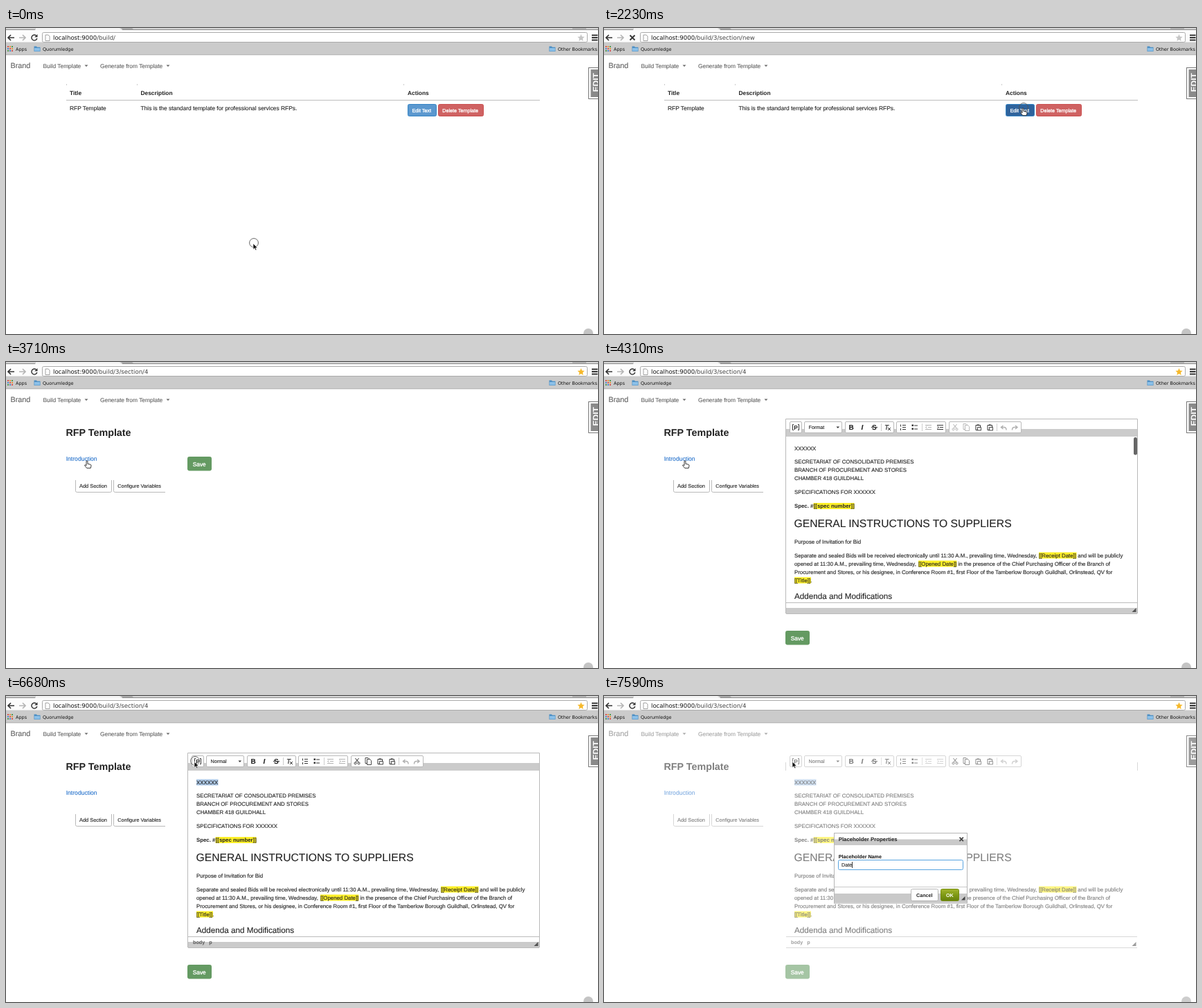
Write an HTML page that moves like this. It is 855x443 px and loops after 8 s.

```html
<!DOCTYPE html>
<html lang="en">
<head>
<meta charset="utf-8">
<title>Template builder</title>
<style>
html,body{margin:0;width:100%;height:100%;overflow:hidden;background:#fff}
svg{display:block;width:100vw;height:100vh}
text{font:8.4px "Liberation Sans",Arial,sans-serif;fill:#222;stroke:#222;stroke-width:.12px;text-rendering:geometricPrecision;white-space:pre}
.ui text{font:6.5px "DejaVu Sans",sans-serif;fill:#111;stroke:none}
.ui #url{font-size:8.57px}
.nav text{fill:#606060;stroke:#606060}
text.b{font-weight:700;stroke:none}
.btn text{font-size:7.2px}
.w text,text.w{fill:#fff;stroke:#fff;stroke-width:.32px}
.doc text,.tool text{font-size:7.83px}
.doc .h1{font-size:15.68px}
.doc .h2{font-size:11.7px}
.tool .ic{font-size:10px;font-weight:700}
.box{fill:#fff;stroke:#b9b9b9}
.band{fill:#cbcbcb}
.hl{fill:#fff028}
.line{fill:none;stroke:#333}
.off{opacity:.38}
.dim #page{opacity:.58}
.dim .tag{opacity:.85}
.dim .band{fill:#fff}
.dim .edge{stroke:none}
</style>
</head>
<body>
<svg id="stage" viewBox="0 0 855 443">
<defs>
  <g id="folder"><path d="M0 1.5h3.5l1 1.2H9V9H0z" fill="#4d8fc4"/><path d="M.6 4h7.8v4.4H.6z" fill="#8cc0e8"/></g>
  <g id="sheet" fill="#fff" stroke="#333" stroke-width=".9"><path d="M0 0h4l2 2v6H0z"/></g>
  <g id="clip" stroke="#333"><path d="M.5 1.500h6.500v7H.5z" fill="#fff"/><path d="M2.500 1.300h2.500" stroke-width="1.800"/><path d="M3 4.500h5v4.500H3z" fill="#fff" stroke-width=".9"/></g>
  <linearGradient id="ok" x2="0" y2="1"><stop stop-color="#a3b52d"/><stop offset=".5" stop-color="#7f9a14"/><stop offset="1" stop-color="#66800c"/></linearGradient>
</defs>

<g id="page">
  <g class="nav">
    <text x="6.5" y="58" style="font-size:10.8px">Brand</text>
    <text x="53.5" y="57.5">Build Template</text>
    <text x="136" y="57.5">Generate from Template</text>
    <path d="M113.500 53.500h5l-2.500 2.600zM231.500 53.500h5l-2.500 2.600z" fill="#666"/>
  </g>

  <g id="list">
    <path d="M87.500 81v2M189.500 81v2M574.500 81v2" stroke="#ccc"/>
    <path d="M87 104.500h684" stroke="#bdbdbd"/>
    <text class="b" x="92" y="96.500">Title</text><text class="b" x="194.500" y="96.500">Description</text><text class="b" x="580" y="96.500">Actions</text>
    <text x="92" y="119.300">RFP Template</text>
    <text x="194.500" y="119.300">This is the standard template for professional services RFPs.</text>
    <g class="btn w">
      <rect id="edit" x="580.500" y="110.500" width="41" height="17" rx="2" stroke="#3585c6"/>
      <text x="586.500" y="121.600">Edit Text</text>
      <rect x="624.500" y="110.500" width="65" height="17" rx="2" fill="#cf6262" stroke="#cb5050"/>
      <text x="630.300" y="121.600">Delete Template</text>
    </g>
  </g>

  <g id="side">
    <text class="b" x="86.500" y="107" style="font-size:14.3px">RFP Template</text>
    <text x="86.700" y="143" style="font-size:8.600px;fill:#2672cc;stroke:#2672cc">Introduction</text>
    <g class="btn">
      <path class="line edge" style="stroke:#b9b9b9" d="M100.500 171v15.500q0 2 2 2h48q2 0 2-2V171M155.500 171v15.500q0 2 2 2H230"/>
      <text x="106" y="182.200" style="font-size:7.400px">Add Section</text>
      <text x="161.300" y="182.200">Configure Variables</text>
    </g>
  </g>

  <g id="save">
    <rect x="262.500" y="137.500" width="34" height="19.500" rx="2" fill="#649a62" stroke="#649a62"/>
    <text class="w" x="269.700" y="150.500">Save</text>
  </g>

  <g id="editor">
    <path class="edge" d="M262.500 364V82.500h508V364" fill="none" stroke="#b9b9b9"/>
    <rect class="band" x="263" y="97" width="507" height="11"/>
    <rect class="band" x="263" y="356" width="507" height="8"/>
    <path d="M263 348.500h507M263 364.500h507M262.500 96v12M770.500 96v12" stroke="#bbb"/>
    <path d="M768.500 356v6h-6z" fill="#555"/>
    <g class="tool">
      <g class="box">
        <rect x="268.500" y="86.500" width="17" height="16" rx="1.500"/><rect x="289.500" y="86.500" width="54" height="16" rx="1.500"/>
        <rect x="348.500" y="86.500" width="70" height="16" rx="1.500"/><rect x="422.500" y="86.500" width="71" height="16" rx="1.500"/>
        <rect x="498.500" y="86.500" width="104" height="16" rx="1.500"/>
      </g>
      <path d="M400.500 89v11M459.500 89v11M567.500 89v11" stroke="#ccc"/>
      <path class="line" d="M274 90.500h-1.500v8h1.500M280 90.500h1.500v8h-1.500"/>
      <text class="b" x="274.300" y="97.500" style="font-size:8.500px">P</text>
      <text id="format" x="295.500" y="97" style="font-size:7.200px"></text>
      <path d="M335.500 93.500h4.600l-2.300 2.600z" fill="#333"/>
      <text class="ic" x="353.500" y="98">B</text>
      <text class="ic" x="371.500" y="98" style="font-style:italic">I</text>
      <text class="ic" x="387" y="98">S</text><path class="line" d="M386 94.500h9"/>
      <text class="ic" x="405" y="97.500" style="font-style:italic;font-weight:400">T</text><path class="line" d="M410 95l4 4m0-4l-4 4"/>
      <path class="line" d="M431 91.500h5M431 94.500h5M431 97.500h5M428.500 90.500v3M428.500 96v3M448 92h5M448 97h5"/>
      <path d="M444.500 90.500h2.500v2.500h-2.500zM444.500 95.500h2.500v2.500h-2.500z" fill="#333"/>
      <path class="line off" d="M464 91.500h9M468 94.500h5M464 97.500h9M466.500 93l-2 1.500 2 1.500"/>
      <path id="indent" class="line" d="M481 91.500h9M485 94.500h5M481 97.500h9M481.500 93l2 1.500-2 1.500"/>
      <g id="cut">
        <path class="line" d="M504.500 90l4.500 6M509.500 90l-4.500 6"/><circle class="line" cx="504.500" cy="97.300" r="1.500"/><circle class="line" cx="509.500" cy="97.300" r="1.500"/>
        <use href="#sheet" x="519" y="89.500"/><use href="#sheet" x="521.500" y="91.500"/>
      </g>
      <use href="#clip" x="536.500" y="90"/><use href="#clip" x="553.500" y="90"/>
      <path class="line off" style="stroke-width:1.500" d="M576.500 92l-3 2.500 3 2.500M574 94.500h4q3 0 3 4M594 92l3 2.500-3 2.500M596.500 94.500h-4q-3 0-3 4"/>
    </g>
    <g class="doc" id="doc">
      <rect id="sel" y="120.500" height="9" fill="#afcbea"/>
      <g class="hl"><rect x="302.500" y="204" width="59" height="9"/><rect x="628" y="275.500" width="54.500" height="9"/><rect x="454" y="287.500" width="55.500" height="9"/><rect x="275" y="311.500" width="24" height="9"/></g>
      <text x="275" y="127.700">XXXXXX</text>
      <text x="275" y="147.400">SECRETARIAT OF CONSOLIDATED PREMISES</text>
      <text x="275" y="159.400">BRANCH OF PROCUREMENT AND STORES</text>
      <text x="275" y="171.400">CHAMBER 418 GUILDHALL</text>
      <text x="275" y="191.200">SPECIFICATIONS FOR XXXXXX</text>
      <text class="b" x="275" y="211.300">Spec. #</text><text class="b" x="302.700" y="211.300">[[spec number]]</text>
      <text class="h1" x="274.500" y="238.700">GENERAL INSTRUCTIONS TO SUPPLIERS</text>
      <text x="275" y="262.500">Purpose of Invitation for Bid</text>
      <text x="275" y="282.500">Separate and sealed Bids will be received electronically until 11:30 A.M., prevailing time, Wednesday,</text>
      <text x="628" y="282.500">[[Receipt Date]] and will be publicly</text>
      <text x="275" y="294.500">opened at 11:30 A.M., prevailing time, Wednesday,</text>
      <text x="454" y="294.500">[[Opened Date]] in the presence of the Chief Purchasing Officer of the Branch of</text>
      <text x="275" y="306.500">Procurement and Stores, or his designee, in Conference Room #1, first Floor of the Tamberlow Borough Guildhall, Orlinstead, QV for</text>
      <text x="275" y="318.500">[[Title]].</text>
      <text class="h2" x="275" y="342.500">Addenda and Modifications</text>
      <path id="caret" d="M275.500 140v9" stroke="#222"/>
      <rect id="bar" x="765" y="109" width="5" height="25.500" rx="2.300" fill="#555"/>
      <text id="status" class="b" x="270" y="358.700" style="font-size:7.200px;fill:#555">body   p</text>
    </g>
  </g>
</g>

<g class="tag">
  <rect x="841.500" y="57.500" width="16" height="45" fill="#fff" stroke="#777"/>
  <rect x="844.500" y="60" width="14" height="40" fill="#8a8a8a"/>
  <text class="b" transform="translate(855.500 92.500)rotate(-90)" style="font-size:12px;fill:#fff">EDIT</text>
  <circle cx="841" cy="442" r="7" fill="#c4c4c4"/>
</g>

<g class="ui">
  <path d="M0 0h855v21H0z" fill="#fcfcfc"/>
  <path d="M0 0h855v3H0z" fill="#d5d5d5"/>
  <path d="M43 0h121l3 3H43z" fill="#f4f4f4"/>
  <path d="M0 2.500h42M168 2.500h687" stroke="#8a8a8a"/>
  <path d="M166 0h16l2 2h-16zM818 0h20v1.500h-20z" fill="#aaa"/>
  <path d="M0 20.500h855V39H0z" fill="#cbcbcb"/><path d="M0 38.800h855" stroke="#aaa" stroke-width=".8"/>
  <rect x="52.500" y="6.500" width="787" height="14" rx="2" fill="#fff" stroke="#aaa"/>
  <path d="M12 14H3.500M7 10l-4 4 4 4" fill="none" stroke="#333" stroke-width="1.700"/>
  <path d="M19 14h8.500M24 10l4 4-4 4" fill="none" stroke="#b5b5b5" stroke-width="1.700"/>
  <g id="reload"><path d="M43.600 11a4 4 0 1 0 1.200 4" fill="none" stroke="#333" stroke-width="1.500"/><path d="M45.500 9v4.300h-4.300z" fill="#333"/></g>
  <path id="stop" d="M37.500 10.500l7 7m0-7l-7 7" stroke="#333" stroke-width="1.800"/>
  <path d="M57 10h4l2 2v6.500h-6z" fill="#fff" stroke="#888" stroke-width=".8"/>
  <text id="url" x="68" y="17.300">localhost:9000<tspan id="path" fill="#444"></tspan></text>
  <path id="star" d="M830.500 9l1.500 3.400 3.600.4-2.700 2.500.8 3.600-3.200-1.900-3.200 1.900.8-3.600-2.700-2.500 3.600-.4z"/>
  <path d="M846 10.500h8.500M846 14h8.500M846 17.500h8.500" stroke="#333" stroke-width="1.800"/>
  <g id="apps"></g>
  <text x="14" y="32.700">Apps</text>
  <use href="#folder" x="40.500" y="25"/><text x="53" y="32.700">Quorumledge</text>
  <use href="#folder" x="784.500" y="25"/><text x="797" y="32.700">Other Bookmarks</text>
</g>

<g id="dialog">
  <rect x="332.500" y="198.500" width="192" height="101.500" fill="#fff" stroke="#b5b5b5"/>
  <path d="M333 207.500h191v8.500H333zM333 286h191v13.500H333z" fill="#c9c9c9"/>
  <path d="M333 276.500h191" stroke="#c9c9c9"/>
  <text class="b" x="338.700" y="209.800" style="font-size:7.800px">Placeholder Properties</text>
  <path d="M513.500 204.700l5.400 5.400m0-5.400l-5.400 5.400" stroke="#444" stroke-width="1.700"/>
  <text class="b" x="338.700" y="235.300" style="font-size:7.200px;fill:#111">Placeholder Name</text>
  <rect x="338.500" y="237.500" width="180" height="14" rx="2" fill="#fff" stroke="#57a3e0"/>
  <text id="typed" x="343" y="247.300" style="font-size:7.200px"></text>
  <path id="typeCaret" d="M0 240v9" stroke="#222" stroke-width=".9"/>
  <rect x="443.500" y="279.500" width="39" height="17" rx="2" fill="#fff" stroke="#b5b5b5"/>
  <text class="b" x="451" y="291" style="font-size:7.200px">Cancel</text>
  <rect x="486.500" y="279.500" width="26" height="17" rx="2" fill="url(#ok)" stroke="#748c10"/>
  <text class="b" x="494" y="291" style="font-size:7.200px;fill:#fff">OK</text>
  <path d="M521.500 290v5.500H516z" fill="#444"/>
</g>

<g id="mouse">
  <circle id="ring" cx="1" cy="-1" r="6.400" fill="none" stroke="#555" stroke-width=".9"/>
  <path id="arrow" d="M0 0v8.500l2-1.800 1.500 3 1.400-.7-1.400-2.800h2.700z" fill="#111" stroke="#fff" stroke-width=".6"/>
  <path id="hand" d="M-1 1q0-1 1-1t1 1v3.500l4 .8q1 .4 1 2l-.8 3.400h-5.400l-3.400-4.200q.6-1.300 2.600.3z" fill="#fff" stroke="#222" stroke-width=".9"/>
  <path id="beam" d="M-2-5q2 0 2 1v8q0 1-2 1M2-5q-2 0-2 1M2 5q-2 0-2-1" fill="none" stroke="#222" stroke-width=".9"/>
</g>
</svg>
<script>
const LOOP = 8000, TICK = 148.3;
const $ = id => document.getElementById(id);
const show = (id, on) => { $(id).style.display = on ? '' : 'none'; };
const set = (id, name, value) => $(id).setAttribute(name, value);

// Bookmark bar grid
const hues = ['#d9534f', '#e8963c', '#4f9a52', '#4a86c9'];
for (let i = 0; i < 9; i++) {
  const dot = document.createElementNS('http://www.w3.org/2000/svg', 'rect');
  const at = { x: 2 + i % 3 * 3, y: 26 + Math.floor(i / 3) * 3, width: 2, height: 2, fill: hues[i % 4] };
  for (const k in at) dot.setAttribute(k, at[k]);
  $('apps').append(dot);
}

// Pointer stops: tick, x, y
const stops = [
  [0, 357, 312], [8, 357, 312], [9, 375, 302], [13, 590, 134], [14, 605, 116],
  [17, 605, 116], [18, 530, 158], [19, 445, 193], [20, 358, 210], [21, 265, 203],
  [22, 180, 174], [23, 117, 143], [29, 117, 143], [33, 279, 144], [34, 287, 140],
  [35, 302, 132], [36, 307, 126], [39, 276, 126], [40, 276, 126], [44, 272, 95], [99, 272, 95]
];

function pointer(n) {
  const i = stops.findIndex(s => s[0] > n);
  const [a, x, y] = stops[i - 1], [b, u, v] = stops[i];
  const p = (n - a) / (b - a);
  return [x + (u - x) * p, y + (v - y) * p];
}

function draw(n) {
  const [x, y] = pointer(n);
  const modal = n >= 46, opened = n >= 24, clicked = n >= 33;

  // Browser bar
  $('path').textContent = '/build/' + (opened ? '3/section/4' : n >= 15 ? '3/section/new' : '');
  const loading = n === 15 || n === 24;
  show('reload', !loading);
  show('stop', loading);
  set('star', 'fill', opened ? '#f6b92c' : '#c6c6c6');

  // Pages
  show('list', n < 16);
  set('edit', 'fill', n < 14 ? '#5b98cf' : n < 15 ? '#3a78b4' : '#2f639c');
  show('side', n >= 16);
  show('save', n >= 25);
  set('save', 'transform', `translate(0 ${n >= 26 ? 252 : 0})`);

  // Editor
  show('editor', n >= 26);
  show('doc', n >= 27);
  $('format').textContent = clicked ? 'Normal' : 'Format';
  show('status', clicked);
  set('indent', 'class', clicked ? 'line off' : 'line');
  set('cut', 'class', n >= 37 ? '' : 'off');
  show('caret', n >= 33 && n < 36);
  show('bar', n < 37);
  set('bar', 'opacity', n < 34 ? 0.9 : n < 36 ? 0.38 : 0.2);
  const left = n < 37 ? 306.5 : n < 39 ? x : 275;
  set('sel', 'x', left);
  set('sel', 'width', 306.5 - left);

  // Dialog
  $('stage').classList.toggle('dim', modal);
  show('dialog', modal);
  const word = 'Date'.slice(0, n < 49 ? 0 : n < 50 ? 1 : n < 51 ? 3 : 4);
  $('typed').textContent = word;
  const w = word ? $('typed').getComputedTextLength() : 0;
  set('typeCaret', 'transform', `translate(${343.3 + w} 0)`);
  show('typeCaret', n >= 47);

  // Pointer
  const hand = n === 14 || n === 15 || (n >= 23 && n < 30);
  const beam = n >= 32 && n < 43;
  set('mouse', 'transform', `translate(${x} ${y})`);
  show('hand', hand);
  show('beam', beam);
  show('arrow', !hand && !beam);
  show('ring', [0, 15, 24, 45].includes(n));
}

let last = -1;
function frame() {
  const n = Math.floor(performance.now() % LOOP / TICK);
  if (n !== last) draw(last = n);
  requestAnimationFrame(frame);
}
frame();
</script>
</body>
</html>
```
